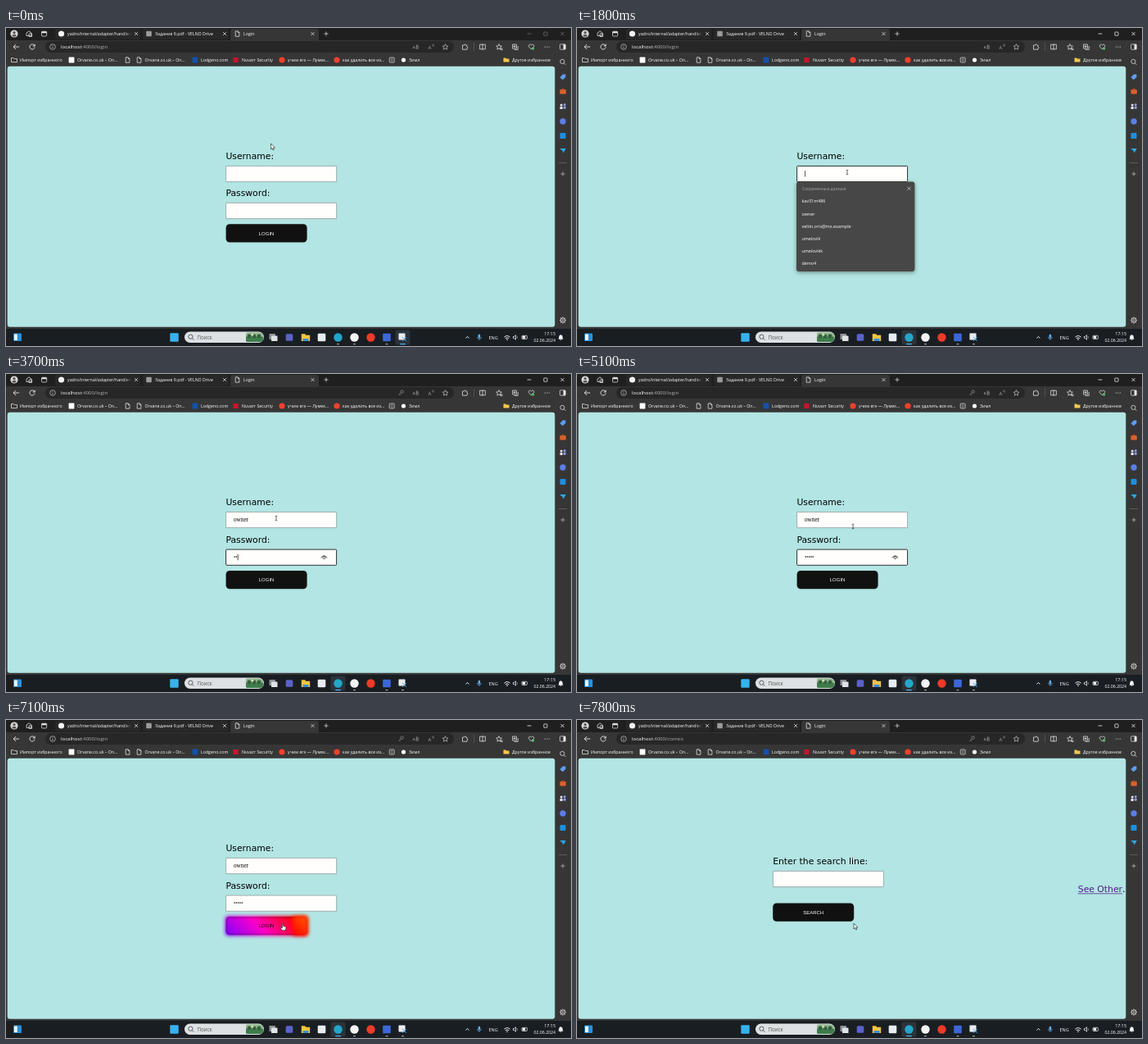
Animation, 690 px wide and 388 px high, one loop 8 s. Source, as an HTML page with a canvas:

```html
<!DOCTYPE html>
<html lang="ru">
<head>
<meta charset="utf-8">
<title>Login</title>
<style>
  html, body { margin: 0; width: 100%; height: 100%; overflow: hidden; background: #363636; }
  canvas { display: block; width: 690px; height: 388px; }
</style>
</head>
<body>
<canvas id="stage"></canvas>
<script>
const W = 690, H = 388, LOOP = 8000, STEP = 100;
const UI = '"Open Sans", "Noto Sans", sans-serif';
const LABEL = '"DejaVu Sans", sans-serif';
const SERIF = '"Liberation Serif", serif';
const SANS = '"Liberation Sans", sans-serif';
const PAGE = '#b2e5e3', INK = '#e8e8e8', BAR = '#363636';

const canvas = document.getElementById('stage');
const ctx = canvas.getContext('2d');
const dpr = window.devicePixelRatio || 1;
canvas.width = W * dpr;
canvas.height = H * dpr;

// Times of the story
const FOCUS = 700, POPUP = 800, TYPED = 2500, ACCEPT = 2900, TO_PASS = 3000,
      PASS = 3700, HOVER = 6800, PRESS = 7100, RELEASE = 7300, OPEN = 7500;

// Pointer hot spot: time, x, y
const TRACK = [
  [0, 323.5, 141], [100, 325, 148], [200, 327, 158], [300, 329, 170], [400, 330, 176],
  [5000, 330, 176], [5200, 344, 196], [5400, 374, 230], [5500, 387, 238],
  [5600, 390, 232], [5700, 390, 224], [5900, 390, 224], [6100, 388.5, 221.5],
  [6500, 388.5, 221.5], [6700, 364, 236], [6900, 342, 247], [7000, 338, 248]
];

const SAVED = ['kav31m486', 'owner', 'veltin.oris@mx.example', 'umelovik', 'umelovikk', 'demo4'];

function pill(x, y, w, h, r, fill, stroke, lw = 0.7) {
  ctx.beginPath();
  ctx.roundRect(x, y, w, h, r);
  if (fill) { ctx.fillStyle = fill; ctx.fill(); }
  if (stroke) { ctx.strokeStyle = stroke; ctx.lineWidth = lw; ctx.stroke(); }
}

const square = (x, y, s, fill, r = 0.6) => pill(x - s / 2, y - s / 2, s, s, r, fill);

function dot(x, y, r, fill, stroke, lw = 0.7) {
  ctx.beginPath();
  ctx.arc(x, y, r, 0, Math.PI * 2);
  if (fill) { ctx.fillStyle = fill; ctx.fill(); }
  if (stroke) { ctx.strokeStyle = stroke; ctx.lineWidth = lw; ctx.stroke(); }
}

// Draws an SVG path around (x, y)
function icon(x, y, d, stroke = INK, lw = 0.75, fill) {
  const p = new Path2D(d);
  ctx.save();
  ctx.translate(x, y);
  if (fill) { ctx.fillStyle = fill; ctx.fill(p); }
  if (stroke) { ctx.strokeStyle = stroke; ctx.lineWidth = lw; ctx.stroke(p); }
  ctx.restore();
}

function text(s, x, y, size, color = '#fff', font = UI, align = 'left') {
  ctx.font = `${font === UI ? 500 : 400} ${size}px ${font}`;
  ctx.fillStyle = color;
  ctx.textAlign = align;
  ctx.fillText(s, x, y);
  return ctx.measureText(s).width;
}

const CROSS = 'M-2-2L2 2M2-2L-2 2';
const PLUS = 'M-2.6 0H2.6M0-2.6V2.6';
const DOC = 'M-2.3-3.2H.7L2.4-1.5V3.2H-2.3ZM.7-3.2V-1.5H2.4';
const STAR = 'M0-3.4L1-1.1 3.4-.9 1.6.8 2.1 3.2 0 1.9-2.1 3.2-1.6.8-3.4-.9-1-1.1Z';
const LENS = 'M1.4 1.4L3.4 3.4M2-.6A2.6 2.6 0 1 1-3.2-.6 2.6 2.6 0 1 1 2-.6';
const FOLDER = 'M-3.5-2.4H-.8L.2-1.4H3.5V2.6H-3.5Z';

function drawTabs(active) {
  pill(0, 0, W, 15, 0, '#1f1f1f');
  pill(60, 1, 104, 13, 2, '#282828');
  pill(167, 1, 105, 13, 2, '#282828');
  pill(274, 1, 108, 16, 3, BAR);
  dot(10, 7, 4.6, '#d8d8d8');
  dot(10, 5.7, 1.6, '#555');
  pill(7.6, 8, 4.8, 2.6, 1.2, '#555');
  icon(28, 7, 'M-3-1L0-3.2 3-1V2.5H-3ZM0 0H3.6V3.4H0Z');
  pill(43.5, 4.2, 6.2, 5.8, 1, null, INK);
  pill(43.5, 4.2, 6.2, 2, 0.5, INK);
  dot(67.5, 7, 3.6, '#f4f4f4');
  text('yadro/internal/adapter/handler/r', 75, 9, 5.25);
  const fade = ctx.createLinearGradient(144, 0, 154, 0);
  fade.addColorStop(0, '#28282800');
  fade.addColorStop(1, '#282828');
  pill(144, 2, 12, 11, 0, fade);
  square(174.5, 7, 6.6, '#9a9a9a', 1);
  text('Задание 9.pdf - VELNO Drive', 182, 9, 5.25);
  icon(282.5, 7, DOC);
  text('Login', 290, 9, 5.4);
  for (const x of [159, 267, 374.5]) icon(x, 7, CROSS, INK, 0.7);
  icon(391, 7, PLUS, INK, 0.7);
  const c = active ? '#fff' : '#777';
  icon(639, 7, 'M-2.4 0H2.4', c);
  pill(656.8, 5, 4.2, 4.2, 0.5, null, c);
  icon(679.5, 7, CROSS, c);
}

function drawToolbar(t) {
  icon(12.5, 23, 'M3.6 0H-3.4M-.4-3L-3.4 0-.4 3', INK, 0.9);
  icon(32, 23, 'M2.9-1.2A3.1 3.1 0 1 0 3.1.4M3.2-3.4V-1H.8', INK, 0.9);
  pill(48, 16, 499, 14, 7, '#272727');
  dot(57, 23, 3.3, null, '#ccc');
  icon(57, 23, 'M0-.4V1.8M0-1.8V-1.1', '#ccc');
  const w = text('localhost', 67, 25.2, 6.1);
  text(t < OPEN ? ':4000/login' : ':4000/comics', 67 + w, 25.2, 6.1, '#b4b4b4');
  if (t >= PASS) {
    dot(483.6, 21.6, 1.7, null, '#999');
    icon(483, 23, 'M-.8 0L-3.4 2.8M-2.4 1.6L-1.4 2.6', '#999');
  }
  text('aあ', 496.5, 25, 5.2, '#aaa', '"Open Sans", "Noto Sans CJK JP", sans-serif');
  text('A', 515.5, 25.5, 6, '#aaa');
  icon(520.5, 21, 'M0-1Q1 0 0 1M1.2-1.8Q2.8 0 1.2 1.8', '#aaa', 0.5);
  icon(536.5, 23, STAR, '#bbb');
  icon(560.5, 23, 'M-3-2H-1A1 1 0 0 1 1-2H2.4V0A1 1 0 0 1 2.4 2V3.2H-3Z');
  pill(571.2, 18, 0.6, 10, 0, '#666');
  icon(582, 23, 'M-3.4-2.8H3.4V2.8H-3.4ZM0-3.6V3.6');
  icon(602, 23, STAR);
  icon(603.5, 25, 'M0 0H3M.6 1.5H3');
  icon(622, 23, 'M-3.4-3H1.4V2H-3.4ZM-1.4 3.4H3.2V-1M-1-2V1M-2.5-.5H.5');
  icon(641.5, 23, 'M0 3L-3.2-.4A1.8 1.8 0 0 1 0-2 1.8 1.8 0 0 1 3.2-.4Z');
  dot(643.5, 25, 1.7, '#55b86b');
  for (const x of [658.3, 660.8, 663.3]) dot(x, 23, 0.6, INK);
  pill(676.5, 19.8, 6.8, 6.4, 1, null, INK);
  pill(680.6, 20, 2.6, 6, 0.5, INK);
}

function drawBookmarks() {
  const mark = (s, x) => text(s, x, 40.8, 5.25);
  icon(10, 39, FOLDER);
  mark('Импорт избранного', 17);
  for (const x of [80, 162.5]) {
    if (x === 80) square(x, 39, 6.8, '#fff');
    else icon(x, 39, DOC);
    mark('Orvane.co.uk – On...', x + 7);
  }
  icon(148.5, 39, DOC);
  square(231, 39, 6.8, '#164fa8');
  mark('Lodgeno.com', 238);
  square(280.5, 39, 6.2, '#c8142c');
  mark('Nuvarr Security', 288);
  dot(337, 39, 3.6, '#f0402c');
  mark('учим егэ — Лумек...', 344);
  dot(404, 39, 3.6, '#f0402c');
  mark('как удалить все из...', 411);
  pill(468.2, 36, 6, 6, 1, null, INK);
  icon(471.2, 39, 'M-1.5-1H1.5M-1.5 1H1.5', INK, 0.6);
  dot(485.5, 39, 2.6, '#fff');
  mark('Зимл', 492);
  icon(611, 39, FOLDER, null, 0, '#f3c64c');
  mark('Другое избранное', 618);
}

function drawSidebar() {
  icon(680, 41.5, LENS);
  icon(680, 59.5, 'M-3.6.8L0-3H3.4V.4L-.2 3.8Z', null, 0, '#5f9df0');
  pill(676.4, 75, 7.4, 5.6, 1, '#d9622d');
  pill(678.4, 73.8, 3.4, 1.6, 0.5, '#a84520');
  dot(678.2, 94, 1.5, '#e4e4ee');
  dot(682.2, 93.4, 1.5, '#8c9be8');
  pill(676.4, 96, 3.4, 3, 1, '#e4e4ee');
  pill(680.6, 95.4, 3.2, 3.4, 1, '#8c9be8');
  dot(680, 114, 3.7, '#5b7ee6');
  square(680, 131.5, 7, '#1d8fe0', 1);
  icon(680, 149.5, 'M-3.8-2.4H3.8L.6 3-.4.4Z', null, 0, '#2aa9e8');
  pill(675, 164, 10, 0.6, 0, '#777');
  icon(680, 178, PLUS, '#bbb');
  dot(680, 356.5, 2.7, null, INK, 0.8);
  dot(680, 356.5, 1, null, INK, 0.6);
  for (let i = 0; i < 8; i++) {
    const a = i * Math.PI / 4;
    dot(680 + 3.4 * Math.cos(a), 356.5 + 3.4 * Math.sin(a), 0.6, INK);
  }
}

function drawTaskbar(active) {
  pill(0, 367, W, 21, 0, '#191e23');
  pill(9, 372.5, 10, 9.5, 1, '#2a8fd8');
  pill(10, 373.5, 3.8, 7.5, 0.5, '#eaf6ff');
  square(205.5, 377.5, 10.4, '#35b3ee', 1);
  pill(218, 370.5, 97, 13.5, 6.7, '#dde1e3');
  icon(226, 377.3, LENS, '#333');
  text('Поиск', 233.5, 379.8, 6.2, '#555');
  pill(293, 371.5, 21.5, 11.5, [2, 5.5, 5.5, 2], '#8db58a');
  pill(293, 376.5, 21.5, 6.5, [0, 2, 5.5, 2], '#3f7d4c');
  for (const x of [297, 303, 309]) dot(x, 376, 2.4, '#35603f');
  dot(301, 374, 1.5, '#e0dcb0');

  pill(active ? 396.5 : 475.5, 368.5, 18, 18, 2, '#2c333a');
  pill(321.5, 373, 7.5, 7, 0.6, '#8d9298');
  pill(324, 375.5, 7.5, 6.5, 0.6, '#dfe3e6');
  square(346, 377.5, 8.6, '#5b62c8', 1.5);
  icon(366, 377.5, 'M-5.2-4.2H-1L.4-2.8H5.2V4.4H-5.2Z', null, 0, '#f5c542');
  pill(362.5, 379, 7, 3, 0.5, '#3b8fd6');
  square(385.5, 377.5, 9.6, '#e6edf2', 1.2);
  dot(405.5, 377.5, 5.2, '#22a6c9');
  dot(425.5, 377.5, 5.2, '#f4f4f4');
  dot(445.5, 377.5, 5.2, '#ee3a28');
  square(465, 377.5, 9.6, '#3d67d8', 1);
  pill(479.5, 372.5, 8, 8, 1, '#e8ecef', '#8b96a0');
  icon(487, 379, 'M-3-2L2 3M2-2L-3 3', '#3b9be0', 0.9);
  for (const x of [405.5, 425.5, 465, 484.5]) {
    const on = x === (active ? 405.5 : 484.5);
    const w = on ? 7 : 3;
    pill(x - w / 2, 385, w, 1.3, 0.6, on ? '#4cb4f0' : '#9aa2a8');
  }

  icon(563.5, 377.5, 'M-2 1L0-1 2 1', '#fff', 0.9);
  pill(576.6, 373.8, 2.6, 4.6, 1.3, '#5fb1ec');
  icon(577.9, 378, 'M-2.4-1A2.4 2.4 0 0 0 2.4-1M0 1.4V3', '#5fb1ec');
  text('ENG', 589.5, 379.5, 5.5);
  icon(612, 379, 'M-3.6-1.8Q0-5 3.6-1.8M-2.2-.2Q0-2 2.2-.2', '#fff', 0.9);
  dot(612, 380.3, 0.8, '#fff');
  icon(622, 377.5, 'M-2.6-1H-1.4L.4-2.8V2.8L-1.4 1H-2.6Z', '#fff');
  icon(624, 377.5, 'M0-1.5Q1 0 0 1.5', '#aaa');
  pill(630, 375.3, 6.4, 4.2, 1, null, '#fff');
  pill(630.8, 376.1, 3.4, 2.6, 0.4, '#fff');
  text('17:15', 671, 375.4, 5.4, '#fff', UI, 'right');
  text('02.06.2024', 671, 383, 5.2, '#fff', UI, 'right');
  icon(677.5, 377.5, 'M-2.6 1.8L-1.8.6V-1A1.8 1.8 0 0 1 1.8-1V.6L2.6 1.8ZM-.8 3H.8', '#fff', 0.7, '#fff');
}

function field(x, y, focused) {
  pill(x, y, 135, 19.2, focused ? 1 : 0.3, '#fffefd', focused ? '#262626' : '#8c9292', focused ? 0.95 : 0.7);
}

const RAINBOW = ['#f00', '#ff7300', '#fffb00', '#48ff00', '#00ffd5', '#002bff', '#7a00ff', '#ff00c8', '#f00'];

// Blurred 45° rainbow, four times the button's width, sliding left
function glow(x, y, w, h, t) {
  const tw = w * 4, d = (tw + h) / 4;
  const seam = 350 - (t - PRESS) * 0.12;
  const tile = (left, from) => {
    if (from >= x + w) return;
    const cx = left + tw / 2, cy = y + h / 2;
    const g = ctx.createLinearGradient(cx - d, cy + d, cx + d, cy - d);
    RAINBOW.forEach((c, i) => g.addColorStop(i / 8, c));
    pill(from, y, x + w - from, h, 4, g);
  };
  ctx.filter = `blur(${2.2 * dpr}px)`;
  tile(seam - tw, x);
  tile(seam, seam);
  ctx.filter = 'none';
}

function button(label, x, y, lit, pressed, t) {
  const body = () => pill(x, y, 99, 22.4, 4.5, '#111');
  body();
  if (lit > 0) {
    ctx.globalAlpha = lit;
    glow(x - 1, y - 1, 101, 24.4, t);
    ctx.globalAlpha = 1;
    if (!pressed) body();
  }
  text(label, x + 49.5, y + 13.3, 6, pressed ? '#000' : '#fff', SANS, 'center');
}

function caret(x, y) { pill(x, y, 0.7, 7.4, 0, '#000'); }

function drawPopup(items) {
  ctx.save();
  ctx.shadowColor = 'rgba(0,0,0,.4)';
  ctx.shadowBlur = 5 * dpr;
  ctx.shadowOffsetY = 1.5 * dpr;
  pill(268, 187.6, 144.4, 18.2 + items.length * 15.2, 3, '#474747');
  ctx.restore();
  text('Сохраненные данные', 275, 197.8, 5, '#a8a8a8');
  icon(405.5, 195.8, CROSS, '#ddd', 0.7);
  items.forEach((s, i) => text(s, 274.5, 213.4 + i * 15.2, 5.4));
}

function drawLogin(t) {
  const dy = t >= FOCUS ? 0.7 : 0;
  const onName = t >= FOCUS && t < TO_PASS, onPass = t >= TO_PASS && t < PRESS;
  text('Username:', 268.4, 160, 10.8, '#000', LABEL);
  field(268.6, 168.4, onName);
  text('Password:', 268.4, 205.2 + dy, 10.8, '#000', LABEL);
  field(268.6, 213.4 + dy, onPass);

  if (t >= TYPED) {
    const hint = t < ACCEPT;
    if (hint) pill(282, 174.2, 14.4, 8, 0, '#c4dafc');
    const w = text('owner', 278, 180.4, 7.2, '#000', SERIF);
    if (hint) {
      pill(298, 174.8, 10, 6.4, 1, '#fff', '#999', 0.6);
      text('Tab', 303, 179.6, 4.2, '#888', UI, 'center');
    } else if (onName) caret(278 + w, 174.4);
  } else if (t >= 1800) caret(278.4, 174.2);

  const dots = t < PASS ? 0 : t < 4000 ? 2 : t < 4200 ? 4 : 5;
  for (let i = 0; i < dots; i++) dot(279.2 + i * 2.25, 223, 0.8, '#000');
  if (onPass && (t < 3500 || t >= PASS) && t < 4700) caret(278.3 + dots * 2.25, 219.8);
  if (onPass && dots) {
    icon(388.5, 223.8, 'M-3.8.4Q0-4.4 3.8.4', '#222', 0.8);
    dot(388.5, 224, 1.5, null, '#222', 0.8);
  }

  const lit = Math.min(1, Math.max(0, (t - HOVER + STEP) / 300));
  button('LOGIN', 268.6, 239.2 + dy, lit, t >= PRESS && t < RELEASE, t);

  if (t >= POPUP && t < ACCEPT) drawPopup(t < TYPED ? SAVED : ['owner']);
}

function drawSearch(t) {
  text('Enter the search line:', 239.2, 176.4, 10.8, '#000', LABEL);
  field(239.4, 184.4, false);
  button('SEARCH', 239.2, 223.4, 0, false, t);
  const w = text('See Other', 611.8, 210.2, 10.8, '#551a8b', LABEL);
  pill(611.8, 211.5, w, 0.8, 0, '#551a8b');
  text('.', 611.8 + w, 210.2, 10.8, '#000', LABEL);
}

function pointerAt(t) {
  let i = TRACK.length - 1;
  while (i > 0 && TRACK[i][0] > t) i--;
  const [t0, x0, y0] = TRACK[i], [t1, x1, y1] = TRACK[i + 1] || [t0 + 1, x0, y0];
  const k = Math.min(1, (t - t0) / (t1 - t0));
  return [x0 + (x1 - x0) * k, y0 + (y1 - y0) * k];
}

function drawPointer(t) {
  const [x, y] = pointerAt(t);
  const over = (l, top, r, b) => t < OPEN && x >= l && x <= r && y >= top && y <= b;
  if (over(384, 219, 393, 228) || over(268, 240, 368, 262)) {
    icon(x, y, 'M-.7.6Q0-.4.7.6V3.4L3.6 4.2Q4.4 4.6 4 6L3.2 8.8H-.8L-3 5.6Q-2.6 4.6-1.6 5.2L-.7 6Z', '#000', 0.6, '#fff');
  } else if (over(268, 168, 404, 188) || over(268, 214, 404, 234)) {
    icon(x, y, 'M-1.3-2.8H-.4L0-2.4.4-2.8H1.3M0-2.4V2.4M-1.3 2.8H-.4L0 2.4.4 2.8H1.3', '#000', 0.6);
  } else {
    icon(x, y, 'M0 0V7L1.6 5.6 2.7 8 3.8 7.5 2.8 5.2H4.9Z', '#111', 0.6, '#fff');
  }
}

function draw(t) {
  ctx.setTransform(dpr, 0, 0, dpr, 0, 0);
  const active = t >= FOCUS;
  pill(0, 0, W, H, 0, BAR);
  drawTabs(active);
  drawToolbar(t);
  drawBookmarks();
  drawSidebar();
  pill(1.7, 46.7, 668.6, 318, 3, PAGE);
  ctx.save();
  ctx.beginPath();
  ctx.rect(1.7, 46.7, 668.6, 318);
  ctx.clip();
  (t < OPEN ? drawLogin : drawSearch)(t);
  ctx.restore();
  drawTaskbar(active);
  drawPointer(t);
}

const start = performance.now();
let shown = -1;
function tick() {
  const t = Math.floor(((performance.now() - start) % LOOP) / STEP) * STEP;
  if (t !== shown) draw(shown = t);
  requestAnimationFrame(tick);
}
tick();
</script>
</body>
</html>
```
